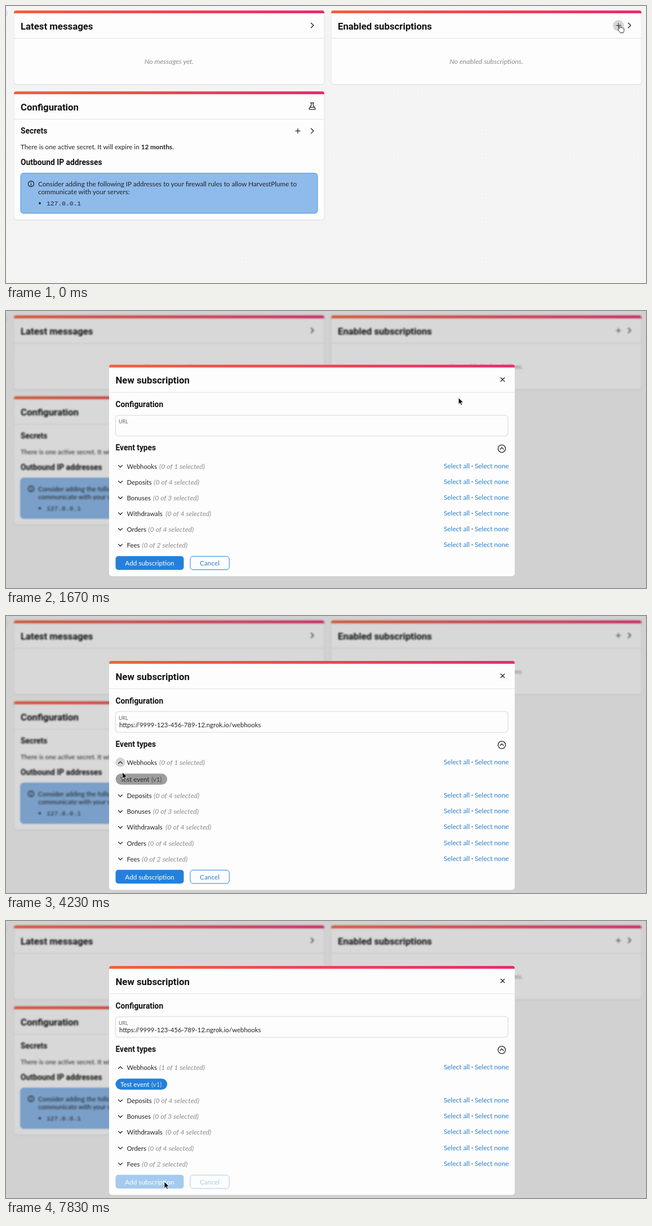
Write an HTML page that moves like this. It is 1136 px wide and 493 px high and loops after 8000 ms.

```html
<!DOCTYPE html>
<html lang="en">
<head>
<meta charset="utf-8">
<title>New subscription</title>
<style>
html, body { margin: 0; height: 100%; overflow: hidden; background: #f4f4f4; }
svg { display: block; width: 100vw; height: 100vh; }
text { font: 11.7px Lato, sans-serif; fill: #222; white-space: pre; }
.h1 { font: 700 16.8px Roboto, sans-serif; fill: #111; }
.h2 { font: 700 13.8px Roboto, sans-serif; fill: #111; }
.hint { font-size: 12.3px; font-style: italic; fill: #8c8c8c; }
.row, .url { font-size: 11.4px; }
.link { font-size: 11.8px; fill: #2a7fc9; }
.tiny { font-size: 8.8px; fill: #666; }
.mono { font: 11.3px "Liberation Mono", monospace; }
.mid { text-anchor: middle; }
.label { font-size: 11.8px; fill: #fff; text-anchor: middle; }
.ico { fill: none; stroke: #222; stroke-width: 1.3; stroke-linecap: round; stroke-linejoin: round; }
.rule { stroke: #e2e2e2; }
</style>
</head>
<body>
<svg viewBox="0 0 1136 493" preserveAspectRatio="none">
  <defs>
    <linearGradient id="hot"><stop stop-color="#f2623a"/><stop offset="1" stop-color="#ea2a6c"/></linearGradient>
    <pattern id="dots" width="6" height="6" patternUnits="userSpaceOnUse">
      <rect width="6" height="6" fill="#f4f4f4"/><rect x="2" y="2" width="1" height="1" fill="#e9e9e9"/>
    </pattern>
  </defs>
  <g id="page"></g>
  <rect id="shade" width="1136" height="493"/>
  <g id="modal">
    <rect id="sheet" x="183" width="720" rx="5" fill="#fdfdfd"/>
    <g id="upper"></g>
    <g id="lower"></g>
  </g>
  <g id="cursor">
    <path id="arrow" d="M0 0V11.6L2.7 9.1 4.6 13.3 6.5 12.4 4.7 8.4H8.4Z" stroke="#fff" stroke-width=".8"/>
    <path id="hand" fill="#fff" stroke="#222" stroke-width="1" stroke-linejoin="round"
      d="M-1.3 6V.8a1.2 1.2 0 0 1 2.4 0V4.5c.3-.8 2-.8 2.2.1.5-.6 1.9-.4 2 .5.6-.4 1.7 0 1.7 1V9c0 2-1 2.6-1.2 4.2H.2C0 11.6-2.6 9.6-3.9 7.6c-.6-1 .6-2 1.5-1.2Z"/>
    <path id="beam" class="ico" style="stroke-width:1.2" d="M-2.6-6Q0-6 0-4.4Q0-6 2.6-6M0-4.5V4.5M-2.6 6Q0 6 0 4.4Q0 6 2.6 6M-1.3 2H1.3"/>
  </g>
</svg>
<script>
const $ = id => document.getElementById(id);
const text = (x, y, cls, s, id = '') => `<text x="${x}" y="${y}" class="${cls}" id="${id}">${s}</text>`;
const icon = (x, y, d, id = '') => `<path class="ico" id="${id}" transform="translate(${x} ${y})" d="${d}"/>`;
const rule = (x, y, w) => `<path class="rule" d="M${x} ${y}h${w}"/>`;
const bar = (x, y, w) => `<path fill="url(#hot)" d="M${x} ${y + 5}v-1q0-4 4-4h${w - 8}q4 0 4 4v1z"/>`;
const RIGHT = 'M-2-4.3L2.3 0-2 4.3', DOWN = 'M-3.4-1.7L0 1.7 3.4-1.7', UP = 'M-3.4 1.7L0-1.7 3.4 1.7';
const PLUS = 'M-4 0H4M0-4V4', CROSS = 'M-3.3-3.3L3.3 3.3M3.3-3.3L-3.3 3.3';
const FLASK = 'M-3-6H3M-1.8-6V-1.5L-5.3 4Q-6 5.8-4.3 5.8H4.3Q6 5.8 5.3 4L1.8-1.5V-6M-3.8 2H3.8';

const card = (x, y, h, title) => `
  <rect x="${x}" y="${y + 1}" width="551" height="${h}" rx="5" fill="#ddd"/>
  <rect x="${x}" y="${y}" width="551" height="${h}" rx="5" fill="#fdfdfd" stroke="#e6e6e6"/>
  ${bar(x, y, 551)}${rule(x, y + 49.5, 551)}${text(x + 12, y + 33.8, 'h1', title)}`;

$('page').innerHTML = `
  <rect x="-20" y="-20" width="1176" height="533" fill="url(#dots)"/>
  <circle cx="-6" cy="12.5" r="8" fill="#fff" stroke="#c4c4c4"/>
  ${card(14, 8, 131.5, 'Latest messages')}${icon(543.5, 34.5, RIGHT)}
  ${text(289.5, 103, 'hint mid', 'No messages yet.')}
  ${card(577, 8, 131.5, 'Enabled subscriptions')}
  <circle id="plusHover" cx="1087" cy="35" r="10" fill="#d6d6d6"/>
  <g stroke-opacity=".8">${icon(1087, 34.7, PLUS)}</g>${icon(1106.5, 34.5, RIGHT)}
  ${text(852.5, 103, 'hint mid', 'No enabled subscriptions.')}
  ${card(14, 152, 228.5, 'Configuration')}${icon(543.5, 178.3, FLASK)}
  ${text(26, 226.7, 'h2', 'Secrets')}${icon(518, 222.3, PLUS)}${icon(543.5, 222.3, RIGHT)}
  ${text(26, 255, '', 'There is one active secret. It will expire in <tspan font-weight="700">12 months</tspan>.')}
  ${text(26, 282.8, 'h2', 'Outbound IP addresses')}
  <rect x="26" y="297.5" width="527" height="71.5" rx="5" fill="#8fbbeb" stroke="#4a94dd"/>
  ${icon(44.5, 316.5, 'M-5 0a5 5 0 1 0 10 0a5 5 0 1 0-10 0M0-.3V2.5M0-2.5V-2.4')}
  ${text(57, 321, '', 'Consider adding the following IP addresses to your firewall rules to allow HarvestPlume to')}
  ${text(57, 335.3, '', 'communicate with your servers:')}
  <circle cx="60" cy="351" r="1.7"/>${text(72, 355, 'mono', '127.0.0.1')}`;

const row = (i, name, countX, count) => {
  const y = 276 + 28.1 * i;
  return icon(203, y + .3, DOWN, 'chev' + i) + text(214.5, y + 4.6, 'row', name) +
    text(countX, y + 4.6, 'hint', `(0 of ${count} selected)`, 'count' + i) +
    text(777, y + 3.6, 'link', 'Select all') + text(826, y + 3.6, 'row', '·') +
    text(832, y + 3.6, 'link', 'Select none');
};

$('upper').innerHTML = `
  ${bar(183, 95.5, 720)}${text(194.5, 129.3, 'h1', 'New subscription')}${icon(881.5, 122, CROSS)}
  ${rule(183, 145, 720)}${text(194.5, 171, 'h2', 'Configuration')}
  <rect id="field" x="194.5" y="185.5" width="696.5" height="37" rx="5" fill="#fdfdfd" stroke-width="1.1"/>
  ${text(200, 200, 'tiny', 'URL')}
  ${text(201, 213.8, 'url', 'https://9999-123-456-789-12.ngrok.io/webhooks', 'url')}
  <rect id="caret" x="201.5" y="203.5" width="1" height="11.5"/>
  ${text(194.5, 248.3, 'h2', 'Event types')}
  <circle class="ico" cx="880" cy="245" r="6.6"/>${icon(880, 244.6, 'M-3 1.4L0-1.6 3 1.4')}
  <circle id="rowHover" cx="203" cy="276" r="8.5" fill="#d4d4d4"/>
  ${row(0, 'Webhooks', 272, 1)}
  <g id="chip"><rect id="pill" x="194.5" y="296" width="91.7" height="19.7" rx="9.85"/>
  ${text(203, 310, 'row', 'Test event', 'chipText')}${text(258, 310, 'row', '(v1)', 'chipNote')}</g>`;

const rows = [['Deposits', 262.3, 4], ['Bonuses', 261, 3], ['Withdrawals', 283.3, 4], ['Orders', 252.3, 4], ['Fees', 241.3, 2]];
$('lower').innerHTML = rows.map((r, i) => row(i + 1, ...r)).join('') + `
  <g id="buttons">
    <rect id="add" x="194.5" y="436.2" width="121" height="24.6" rx="5"/>
    ${text(255, 453, 'label', 'Add subscription')}
    <rect x="327" y="436.7" width="69.3" height="23.8" rx="5" fill="none" stroke="#2480dc"/>
    ${text(361.5, 453, 'mid link', 'Cancel')}
  </g>`;

const ramp = (t, a, b) => Math.min(1, Math.max(0, (t - a) / (b - a)));
const ease = p => p * p * (3 - 2 * p);
const blend = (p, a, b) => `rgb(${a.map((v, i) => Math.round(v + (b[i] - v) * p))})`;
const show = (id, on) => $(id).style.opacity = +on;

// Pointer legs: start, end, target x, target y
const legs = [
  [1200, 1930, 687, 203], [3190, 3200, 683, 203], [3340, 3850, 206.5, 278],
  [4250, 4570, 222, 286], [4700, 5030, 266, 289], [5920, 5930, 268, 292], [6300, 6870, 281, 464]
];

function pointer(t) {
  let x = 1090, y = 34.5;
  for (const [a, b, tx, ty] of legs) {
    const p = ease(ramp(t, a, b));
    x += (tx - x) * p;
    y += (ty - y) * p;
  }
  let kind = 'arrow';
  if (t < 790 || (t >= 3800 && t < 4200)) kind = 'hand';
  else if (t < 3800) kind = x < 891 && y > 185 && y < 223 ? 'beam' : 'arrow';
  else if (t > 4265 && t < 7730 && (y < 301 || y > 452)) kind = 'hand';
  return { x, y, kind };
}

function draw(t) {
  const open = ramp(t, 670, 830), grow = t >= 4200, shift = grow ? 15.5 : 0;
  $('page').style.filter = open ? `blur(${1.7 * open}px)` : 'none';
  show('plusHover', 1 - ramp(t, 800, 930));
  show('shade', .145 * open);
  show('modal', open);
  $('sheet').setAttribute('y', 95.5 - shift);
  $('sheet').setAttribute('height', 376.5 + 2 * shift);
  $('upper').setAttribute('transform', `translate(0 ${-shift})`);
  $('lower').setAttribute('transform', `translate(0 ${shift})`);

  const focus = t >= 1930 && t < 4130;
  $('field').setAttribute('stroke', focus ? '#4a98d8' : '#d8d8d8');
  show('caret', (t >= 1930 && t < 2430) || (t >= 2930 && t < 3030));
  show('url', t >= 3030);

  show('rowHover', ramp(t, 3800, 3860) * (1 - ramp(t, 4260, 4400)));
  $('chev0').setAttribute('d', grow ? UP : DOWN);
  show('chip', grow);
  const picked = ramp(t, 5670, 5770);
  $('count0').textContent = `(${t >= 5670 ? 1 : 0} of 1 selected)`;
  $('pill').style.fill = blend(picked ** 1.5, [157, 157, 157], [36, 128, 220]);
  const ink = ramp(t, 5660, 5700);
  $('chipText').style.fill = blend(ink, [38, 38, 38], [255, 255, 255]);
  $('chipNote').style.fill = blend(ink, [72, 72, 72], [190, 218, 246]);

  const off = ramp(t, 7700, 7830);
  $('add').style.fill = blend(ramp(t, 6760, 6870) * (1 - off), [36, 128, 220], [30, 112, 196]);
  show('buttons', 1 - .6 * off);

  const c = pointer(t);
  $('cursor').setAttribute('transform', `translate(${c.x} ${c.y})`);
  for (const k of ['arrow', 'hand', 'beam']) show(k, k === c.kind);
}

const begin = performance.now();
function tick() {
  draw((performance.now() - begin) % 8000);
  requestAnimationFrame(tick);
}
tick();
</script>
</body>
</html>
```
